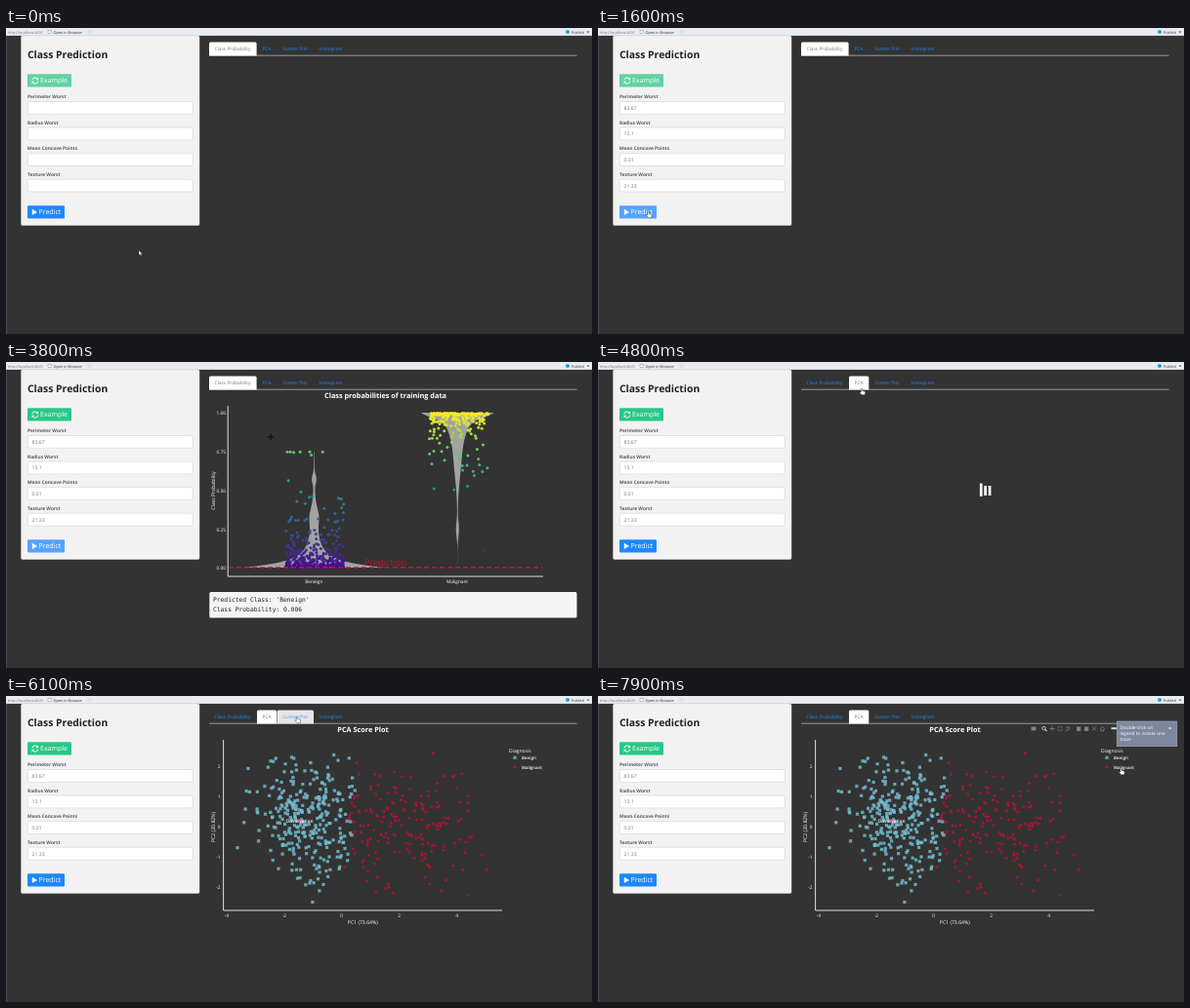
Animation of 600x314 px, one loop 8000 ms. Source, as an HTML page:

```html
<!DOCTYPE html>
<html lang="en">
<head>
<meta charset="utf-8">
<title>Class Prediction</title>
<style>
html, body { margin: 0; width: 100%; height: 100%; overflow: hidden; background: #333; }
svg { display: block; width: 100vw; height: 100vh; }
text { font-family: "Open Sans", sans-serif; text-rendering: geometricPrecision; white-space: pre; }
.mono { font-family: "DejaVu Sans Mono", monospace; }
.b { font-weight: 700; }
.m { font-weight: 600; }
</style>
</head>
<body>
<svg id="stage" viewBox="0 0 600 314" xmlns="http://www.w3.org/2000/svg"></svg>
<script>
const LOOP = 8000, STEP = 100;
const stage = document.getElementById('stage');

function el(name, attrs, parent = stage) {
  const node = document.createElementNS(stage.namespaceURI, name);
  for (const k in attrs) node.setAttribute(k, attrs[k]);
  return parent.appendChild(node);
}
const group = (parent, attrs = {}) => el('g', attrs, parent);
const rect = (g, x, y, width, height, fill, more) => el('rect', { x, y, width, height, fill, ...more }, g);
const path = (g, d, more) => el('path', { d, fill: 'none', ...more }, g);
const dot = (g, cx, cy, r, fill, more) => el('circle', { cx, cy, r, fill, ...more }, g);
function text(g, str, x, y, size, fill, more) {
  const t = el('text', { x, y, 'font-size': size, fill, ...more }, g);
  t.textContent = str;
  return t;
}
const mid = { 'text-anchor': 'middle' }, end = { 'text-anchor': 'end' };
const show = (g, on) => g.setAttribute('display', on ? 'inline' : 'none');

function random(seed) {
  return () => {
    seed = (seed * 1664525 + 1013904223) % 4294967296;
    return seed / 4294967296;
  };
}
const expo = rnd => -Math.log(1 - rnd());
const gauss = rnd => Math.sqrt(2 * expo(rnd)) * Math.cos(2 * Math.PI * rnd());
const bell = (v, centre, width) => Math.exp(-(((v - centre) / width) ** 2));

function mix(a, b, k) {
  return `rgb(${a.map((v, i) => Math.round(v + (b[i] - v) * k))})`;
}
const ramp = [[74, 12, 140], [59, 82, 145], [33, 148, 140], [94, 205, 98], [250, 236, 35]];
function heat(p) {
  const s = Math.min(p, 0.999) * 4, i = Math.floor(s);
  return mix(ramp[i], ramp[i + 1], s - i);
}

// Window bar
rect(stage, 0, 8, 0.8, 306, '#50505e');
rect(stage, 0, 0, 600, 8, '#e8ecf1');
rect(stage, 0, 7.4, 600, 0.6, '#c9ced6');
text(stage, 'http://localhost:4820', 2, 5.6, 3.7, '#777');
rect(stage, 43, 2.2, 3.6, 3.2, '#fff', { stroke: '#7d8894', 'stroke-width': 0.5 });
text(stage, 'Open in Browser', 48.5, 5.7, 3.8, '#333');
dot(stage, 85.5, 4, 1.6, 'none', { stroke: '#c0c6ce', 'stroke-width': 0.5 });
dot(stage, 575, 4, 2.1, '#2e9fd4');
text(stage, 'Publish', 579, 5.7, 3.8, '#333');
path(stage, 'M594.5 3.4h3l-1.5 1.8z', { fill: '#555' });

// Input panel
rect(stage, 15.5, 8, 182.5, 194.5, '#f2f2f2', { rx: 1.5, stroke: '#dcdcdc', 'stroke-width': 0.5 });
text(stage, 'Class Prediction', 22, 30.8, 10.4, '#222', { class: 'b' });

function button(label, y, width, textX) {
  const face = rect(stage, 22, y, width, 13.3, '#fff', { rx: 1.3 });
  text(stage, label, textX, y + 9.2, 7, '#fff');
  return face;
}
const example = button('Example', 47.2, 45, 35);
const predict = button('Predict', 182.2, 38, 33.5);
path(stage, 'M26.8 53.5A3 3 0 0 1 32.3 52.3M32.9 54.5A3 3 0 0 1 27.4 55.8', { stroke: '#fff' });
path(stage, 'M33.1 50.6v2.7h-2.7zM26.6 57.5v-2.7h2.7zM26.8 185.8l5.2 3.1l-5.2 3.1z', { fill: '#fff' });

const fields = {
  'Perimeter Worst': '83.67', 'Radius Worst': '13.1',
  'Mean Concave Points': '0.01', 'Texture Worst': '21.33'
};
const values = Object.entries(fields).map(([label, value], i) => {
  const y = 75.5 + i * 26.6;
  text(stage, label, 22, y - 3.5, 4.8, '#5a5a5a', { class: 'b' });
  rect(stage, 22.2, y, 169, 12.8, '#fff', { rx: 1.2, stroke: '#d2d2d2', 'stroke-width': 0.6 });
  return text(stage, value, 26.6, y + 8.3, 5.1, '#777');
});

// Tabs
path(stage, 'M208 28.2H584.5', { stroke: '#c4c4c4', 'stroke-width': 0.7 });
const tabWidths = { 'Class Probability': 48.6, 'PCA': 20.3, 'Scatter Plot': 37.3, 'Histogram': 34 };
let tabX = 208;
const tabs = Object.entries(tabWidths).map(([label, w]) => {
  const tab = {
    box: path(stage, `M${tabX} 28.5V16q0 -1.5 1.5 -1.5h${w - 3}q1.5 0 1.5 1.5V28.5z`),
    label: text(stage, label, tabX + 5.6, 23.1, 4.83, '')
  };
  tabX += w + 0.4;
  return tab;
});

// Loading bars
const loader = group(stage);
const bars = [0, 1, 2].map(i => rect(loader, 390.9 + i * 4.4, 127, 2.7, 10, '#fff'));

// Shared chart parts
function chart(left, right, title, titleX) {
  const g = group(stage);
  path(g, `M${left} 45V220H${right}`, { stroke: '#f2f2f2', 'stroke-width': 0.9 });
  text(g, title, titleX, 36.7, 7.3, '#fff', { class: 'b', ...mid });
  return g;
}
const note = (g, str, x, y, more) => text(g, str, x, y, 4.75, '#fff', more);
function sideTitle(g, str, x, y) {
  text(g, str, 0, 0, 5.15, '#fff', { ...mid, transform: `translate(${x} ${y}) rotate(-90)` });
}

// Class probabilities
const violins = chart(227.2, 550, 'Class probabilities of training data', 388.5);
for (let i = 0; i < 5; i++) note(violins, (i / 4).toFixed(2), 225, 213.3 - i * 39.75, end);
sideTitle(violins, 'Class Probability', 214, 132);
note(violins, 'Beneign', 315.3, 227, mid);
note(violins, 'Malignant', 462, 227, mid);

function violin(cx, top, bottom, half) {
  let left = '', right = '';
  for (let y = top; y <= bottom; y++) {
    left += `L${cx - half(y)} ${y}`;
    right = `L${cx + half(y)} ${y}` + right;
  }
  path(violins, 'M' + (left + right).slice(1) + 'z', { fill: '#a2a2a2' });
}
violin(315.5, 92, 211, y => 58 * Math.exp((y - 211) / 6) + 15 * Math.exp((y - 211) / 28) +
  2.6 * bell(y, 158, 12) + 1.8 * bell(y, 120, 6));
violin(462.3, 52, 207, y => 16 * bell(y, 52, 7) + 21 * Math.exp((52 - y) / 24) +
  1.5 * bell(y, 107, 25) + 1.4 * bell(y, 172, 11));

function probes(count, left, seed, chance) {
  const rnd = random(seed);
  for (let i = 0; i < count; i++) {
    const x = left + rnd() * 60, p = Math.max(0.004, chance(rnd));
    dot(violins, x.toFixed(1), (211.3 - p * 158.8).toFixed(1), 1.5, heat(p));
  }
}
probes(340, 286, 41, rnd => Math.min(0.75, 0.08 * expo(rnd) ** 1.35));
probes(205, 433.5, 23, rnd => 0.998 - 0.045 * expo(rnd) ** 2);

path(violins, 'M228 210.8H549.5', { stroke: '#e3122d', 'stroke-width': 1.3, 'stroke-dasharray': '5 3' });
text(violins, 'Prediction', 388.5, 208.6, 9.2, '#c8102c', mid);
rect(violins, 208.3, 236, 376.2, 26.5, '#f4f4f4', { rx: 1.5 });
["Predicted Class: 'Beneign'", 'Class Probability: 0.006'].forEach((line, i) =>
  text(violins, line, 212, 246.3 + i * 9.9, 6.3, '#222', { class: 'mono' }));

// PCA scores
const pca = chart(222.6, 508, 'PCA Score Plot', 365.5);
for (let i = -2; i <= 2; i++) {
  note(pca, i * 2, 343.7 + i * 58.9, 227.2, mid);
  note(pca, i, 219.5, 136.4 - i * 31, end);
}
text(pca, 'PC1 (73.64%)', 365.3, 234.2, 5.15, '#fff', mid);
sideTitle(pca, 'PC2 (20.82%)', 214.3, 134.5);

const square = (x, y) => rect(pca, (x - 1.6).toFixed(1), (y - 1.6).toFixed(1), 3.2, 3.2, '#74bdd1', { opacity: 0.82 });
const round = (x, y) => dot(pca, x.toFixed(1), y.toFixed(1), 1.45, '#ab1430');
function cloud(count, seed, cx, cy, sx, sy, left, right, mark) {
  const rnd = random(seed);
  while (count) {
    const x = cx + gauss(rnd) * sx, y = cy + gauss(rnd) * sy;
    if (x < left || x > right || y < 52 || y > 212) continue;
    mark(x, y);
    count--;
  }
}
cloud(185, 77, 400, 131, 38, 30, 346, 496, round);
cloud(305, 19, 310, 127, 26, 33, 236, 362, square);
dot(pca, 300, 128, 1.8, '#e0203a');
note(pca, 'Observation', 300.5, 129.8, { ...mid, class: 'm' });

text(pca, 'Diagnosis', 515, 58, 5, '#fff');
square(521, 63.2);
note(pca, 'Benign', 528, 65, { 'font-size': 4.4, class: 'm' });
round(521, 73);
note(pca, 'Malignant', 528, 74.8, { 'font-size': 4.3, class: 'm' });

// Chart tools
const tools = group(pca, { stroke: '#858585', 'stroke-width': 0.8 });
rect(tools, 444, 32, 4, 3, '#858585');
dot(tools, 456.5, 33, 1.7, 'none', { stroke: '#ddd' });
path(tools, 'M457.7 34.3l1.8 1.8', { stroke: '#ddd', 'stroke-width': 1.2 });
path(tools, 'M462.5 33.5h5M465 31v5M479 33q2 -2.5 4 -.5q0 3 -3.500 2.500l-1 1.300');
rect(tools, 471, 31.6, 4, 4, 'none', { 'stroke-dasharray': '1 .6' });
rect(tools, 490.5, 32, 3.4, 3.4, '#858585');
rect(tools, 498.5, 32, 3.4, 3.4, '#858585');
path(tools, 'M506 31.5l4 4m-4 0l4 -4M514 33.7l2.5 -2.2l2.5 2.2M515 33.5v2.300h3v-2.300');
path(tools, 'M525.5 33.2h5.500', { stroke: '#ddd', 'stroke-width': 2 });

const toast = group(stage);
rect(toast, 531.2, 26, 61.6, 25.7, '#7d879d', { stroke: '#a3acbe', 'stroke-width': 0.6 });
['Double-click on', 'legend to isolate one', 'trace'].forEach((line, i) =>
  note(toast, line, 534.5, 33.6 + i * 6.1));
text(toast, '×', 584, 34.8, 5.5, '#fff', { class: 'b' });

// Pointers, each with its tip at the origin
const ink = { fill: '#fff', stroke: '#111', 'stroke-width': 0.4 };
const pointers = {
  arrow: path(stage, 'M0 0V5.2L1.2 4.2L2.1 6L3 5.6L2.2 3.8H3.700z', ink),
  hand: path(stage, 'M-.7 .5q.7 -1 1.400 0V2.500l2.500 .7q.7 .2 .5 1.100L3.200 6.800H0L-2.100 4.200q.1 -1 1.400 -.1z', ink),
  cross: path(stage, 'M-3.3 0H3.3M0 -3.3V3.3', { stroke: '#080808', 'stroke-width': 0.9 })
};

// Resting places of the pointer
const stops = [
  { from: 0, to: 0, x: 136, y: 228 },
  { from: 800, to: 1050, x: 47, y: 54 },
  { from: 1500, to: 2680, x: 51.5, y: 188 },
  { from: 2900, to: 3200, x: 130.5, y: 230.5 },
  { from: 3700, to: 4050, x: 271, y: 77 },
  { from: 4500, to: 5200, x: 270, y: 27 },
  { from: 5900, to: 6700, x: 298, y: 21 },
  { from: 7300, to: LOOP, x: 535.5, y: 74 }
];
const smooth = k => k * k * (3 - 2 * k);
const span = (t, a, b) => Math.min(1, Math.max(0, (t - a) / (b - a)));

function pointerAt(t) {
  let { x, y } = stops[0];
  for (let i = 1; i < stops.length; i++) {
    const k = smooth(span(t, stops[i - 1].to, stops[i].from));
    x += (stops[i].x - x) * k;
    y += (stops[i].y - y) * k;
  }
  return [x, y];
}
function pulse(u) {
  u -= Math.floor(u);
  return u < 0.4 ? smooth(u / 0.4) : u < 0.8 ? smooth((0.8 - u) / 0.4) : 0;
}

function draw(t) {
  const [x, y] = pointerAt(t);
  const over = (left, top, right, bottom) => x >= left && x <= right && y >= top && y <= bottom;
  const onViolins = t >= 3300 && t < 4600, onPca = t >= 5100;
  const loading = t >= 2700 && !onViolins && !onPca;
  const active = t < 4600 ? 0 : 1;

  values.forEach(v => show(v, t >= 1000));
  example.setAttribute('fill', mix([98, 210, 163], [40, 199, 133], span(t, 2650, 2850)));
  const overPredict = over(22, 182, 60, 195);
  const lit = overPredict || (t >= 2650 && t < 4600);
  predict.setAttribute('fill', lit ? '#54a4fb' : '#2087fb');

  const overScatter = onPca && over(278, 14, 315, 28);
  tabs.forEach(({ box, label }, i) => {
    const hot = i === 2 && overScatter;
    box.setAttribute('fill', i === active ? '#fff' : hot ? '#e4e7ea' : 'none');
    label.setAttribute('fill', i === active ? '#777' : hot ? '#5ba3ea' : '#2a87ea');
  });

  show(violins, onViolins);
  show(pca, onPca);
  show(loader, loading);
  // The first spinner stalls while the page is busy
  const beat = active ? (t - 4650) / 1000 : 0.68;
  bars.forEach((bar, i) => {
    const p = pulse(beat - i * 0.16);
    bar.setAttribute('y', 127 - 7.5 * p);
    bar.setAttribute('height', 10 + 10 * p);
  });

  tools.setAttribute('opacity', span(t, 6900, 7200));
  toast.setAttribute('opacity', span(t, 7300, 7800));

  const overLink = overPredict || over(22, 47, 67, 60) || over(257, 14, 350, 28) || (onPca && over(515, 60, 550, 76));
  const overPlot = (onViolins && over(227, 45, 550, 220)) || (onPca && over(222, 45, 508, 220));
  const kind = overLink ? 'hand' : overPlot ? 'cross' : 'arrow';
  for (const name in pointers) {
    show(pointers[name], name === kind);
    pointers[name].setAttribute('transform', `translate(${x.toFixed(2)} ${y.toFixed(2)})`);
  }
}

const start = performance.now();
function tick() {
  const t = (performance.now() - start) % LOOP;
  draw(Math.floor(t / STEP) * STEP);
  requestAnimationFrame(tick);
}
draw(0);
requestAnimationFrame(tick);
</script>
</body>
</html>
```
